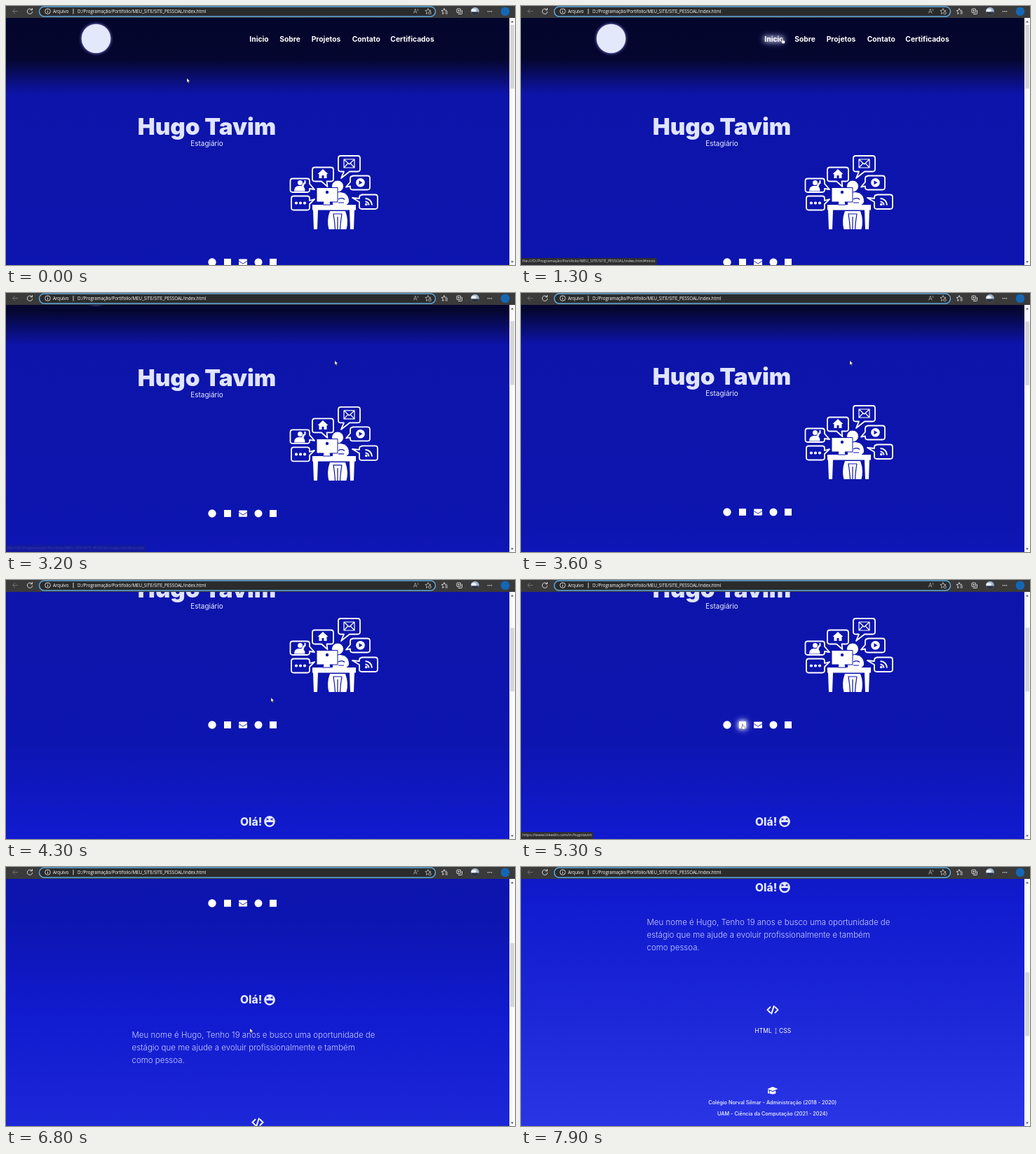
Recreate the animation shown at these times as an HTML page. Size 726 by 370 pixels, loop 8 s.

```html
<!DOCTYPE html>
<html lang="pt-BR">
<head>
<meta charset="utf-8">
<title>Portifolio</title>
<style>
html, body { margin: 0; width: 100%; height: 100%; overflow: hidden; background: #0d14ab; }
svg { position: absolute; left: 0; top: 0; display: block; }
.nav { font: 700 10.3px Inter, sans-serif; fill: #fff; text-anchor: middle; }
.title { font: 900 33.3px Inter, sans-serif; fill: #dfe4ff; text-anchor: middle; }
.role { font: 400 10px Inter, sans-serif; fill: #e9ecff; text-anchor: middle; }
.hello { font: 800 15.6px Inter, sans-serif; fill: #e3e7ff; }
.about { font: 300 11.5px Inter, sans-serif; fill: #c9cfff; }
.skill { font: 400 8.5px Inter, sans-serif; fill: #fff; }
.school { font: 500 7.3px Inter, sans-serif; fill: #f4f5ff; text-anchor: middle; }
.url { font: 500 6.24px "Open Sans", sans-serif; fill: #fff; }
.glow { filter: drop-shadow(0 0 3px #fff) drop-shadow(0 0 5px #aab4ff); }
#status {
  position: absolute; left: 0; bottom: 0; box-sizing: border-box; height: 10px; padding: 0 2px;
  font: 400 5.38px/9.5px "Open Sans", sans-serif; white-space: nowrap;
  color: #dcdcdc; background: #2e2e30; border-radius: 0 2px 0 0;
}
</style>
</head>
<body>
<svg width="726" height="370" viewBox="0 0 726 370">
  <defs>
    <linearGradient id="sky" gradientUnits="userSpaceOnUse" x1="0" y1="0" x2="0" y2="850">
      <stop offset="0" stop-color="#04052b"/>
      <stop offset=".09" stop-color="#05062f"/>
      <stop offset=".148" stop-color="#0d14a9"/>
      <stop offset=".46" stop-color="#0d15b0"/>
      <stop offset=".62" stop-color="#111bcf"/>
      <stop offset=".8" stop-color="#1c27d8"/>
      <stop offset="1" stop-color="#2a36e6"/>
    </linearGradient>
    <clipPath id="face"><circle cx="669" cy="7.500" r="5.800"/></clipPath>
  </defs>

  <g id="page">
    <rect width="718" height="900" fill="url(#sky)"/>
    <circle cx="128.500" cy="46.500" r="20.800" fill="#e4e8fb" style="filter:drop-shadow(0 0 2px #8f9bff)"/>

    <g class="nav">
      <text class="link" x="361" y="50.500">Inicio</text>
      <text class="link" x="405" y="50.500">Sobre</text>
      <text class="link" x="456.500" y="50.500">Projetos</text>
      <text class="link" x="513.700" y="50.500">Contato</text>
      <text x="579.500" y="50.500">Certificados</text>
    </g>

    <text class="title" x="286.500" y="184">Hugo Tavim</text>
    <text class="role" x="286.500" y="200">Estagiário</text>

    <!-- speech bubbles -->
    <g fill="none" stroke="#fff" stroke-width="1.800" stroke-linejoin="round">
      <path d="M477.500 214h24q3.500 0 3.500 3.500v15.500q0 3.500-3.500 3.500h-11.500l-12 9.500 4-9.500h-4.500q-3.500 0-3.500-3.500v-15.500q0-3.500 3.500-3.500z"/>
      <path d="M440.500 230.500h23q3.500 0 3.500 3.500v13q0 3.500-3.500 3.500h-6l1 7.500-8.500-7.500h-9.500q-3.500 0-3.500-3.500v-13q0-3.500 3.500-3.500z"/>
      <path d="M409 246.500h20.500q3.500 0 3.500 3.500v4l7 8-7-1v1.500q0 3.500-3.500 3.500h-20.500q-3.500 0-3.500-3.500v-12.500q0-3.500 3.500-3.500z"/>
      <path d="M410.500 271.500h19q3.500 0 3.500 3.500v3l7-2-7 7v5q0 3.500-3.500 3.500h-19q-3.500 0-3.500-3.500v-13q0-3.500 3.500-3.500z"/>
      <path d="M494.500 242.500h21q3.500 0 3.500 3.500v13q0 3.500-3.500 3.500h-21q-3.500 0-3.500-3.500v-1.500l-6 1 6-7v-5q0-3.500 3.500-3.500z"/>
      <path d="M507.500 269.500h19q3.500 0 3.500 3.500v13.500q0 3.500-3.500 3.500h-19q-3.500 0-3.500-3.500v-6.500l-10-6 10 1v-1.500q0-3.500 3.500-3.500z"/>
      <path d="M482 219h15v12h-15zl7.500 7 7.500-7M482 231l5.500-6M497 231l-5.500-6" stroke-width="1.200"/>
      <path d="M512.500 279.500a5 5 0 0 1 5 5M512.500 275a9.500 9.500 0 0 1 9.500 9.500" stroke-width="2"/>
    </g>
    <g fill="#fff">
      <path d="M452 233l7.500 7h-2v6h-4v-4h-3v4h-4v-6h-2z"/>
      <circle cx="419.500" cy="252.500" r="3.500"/>
      <path d="M411 264.500q0-7 6-7.500h4.500l3-5 2 1-2 5q2 2 2 6.500z"/>
      <path d="M425.500 249h2v5h-2z"/>
      <circle cx="414" cy="281.500" r="2.100"/><circle cx="420" cy="281.500" r="2.100"/><circle cx="426" cy="281.500" r="2.100"/>
      <circle cx="505.500" cy="252.300" r="6.300"/>
      <circle cx="513.800" cy="283.500" r="1.800"/>
      <!-- worker and desk -->
      <path d="M466 266.500q16-3 21.500 5.500 4 9-2 12h-19.500z"/>
      <circle cx="473" cy="257.500" r="8.500" stroke="#0d14ab" stroke-width="1"/>
      <path d="M437 284h62v7.500h-2l-1 27.500h-5l-1-27.500h-45l-1 27.500h-5l-1-27.500h-1z"/>
      <path d="M462 293h22q5 13 1.500 26h-25q-3.500-13 1.500-26z"/>
      <path d="M443 259.500h30v20.500h-11l1 4h-11l1-4h-10z" stroke="#0d14ab" stroke-width="1"/>
    </g>
    <g fill="#0d14ab">
      <circle cx="458" cy="266" r="2.200"/>
      <path d="M503.500 249.300l5 3-5 3z"/>
    </g>
    <g fill="none" stroke="#0d14ab" stroke-width="1.200">
      <path d="M474 276q6-3 9 .5M474 281h8"/>
      <path d="M479 297h-12q2 12 2.500 22M479 297q-2 12-2.500 22M473 301v18"/>
    </g>

    <!-- contact row -->
    <g fill="#fff">
      <circle class="link" cx="294" cy="366" r="5.700"/>
      <rect class="link" x="311" y="361" width="10" height="10"/>
      <g class="link">
        <rect x="332" y="361.500" width="12" height="9.300" rx="1.300"/>
        <path d="M332 364.300l6 3.900 6-3.900" fill="none" stroke="#0d15b0" stroke-width=".9"/>
      </g>
      <circle class="link" cx="360" cy="366" r="5.500"/>
      <rect x="376" y="361" width="10" height="10"/>
    </g>

    <text class="hello" x="334" y="509.700">Olá!</text>
    <circle cx="376" cy="504" r="7.900" fill="#e3e7ff"/>
    <g fill="none" stroke="#111bcf" stroke-width="1.200">
      <path d="M371.500 502l2.500-1-2.500-1.500M380.500 502l-2.500-1 2.500-1.500"/>
      <path d="M371 505h10q-1 4.500-5 4.500t-5-4.500z" fill="#111bcf" stroke="none"/>
    </g>

    <g class="about">
      <text x="179.500" y="558">Meu nome é Hugo, Tenho 19 anos e busco uma oportunidade de</text>
      <text x="179.500" y="576">estágio que me ajude a evoluir profissionalmente e também</text>
      <text x="179.500" y="594">como pessoa.</text>
    </g>

    <path d="M355.500 675l-4 4 4 4M362.500 675l4 4-4 4M360.800 673.500l-3.600 11" fill="none" stroke="#fff" stroke-width="1.900" stroke-linecap="round"/>
    <text class="skill" x="333.500" y="712">HTML</text>
    <text class="skill" x="368" y="712">CSS</text>

    <path d="M351.500 792l7.500-3 7.500 3-7.500 3zM355 794.500l4 1.600 4-1.600.6 3.600q-4.600 2.500-9.200 0zM352.500 793h1l.6 5.500h-2.200z" fill="#fff"/>
    <g class="school">
      <text x="358.700" y="813.500">Colégio Norval Silmar - Administração (2018 - 2020)</text>
      <text x="358.700" y="829.500">UAM - Ciência da Computação (2021 - 2024)</text>
    </g>
  </g>

  <!-- scroll bar -->
  <rect x="718" y="17" width="8" height="353" fill="#fafafa"/>
  <rect id="thumb" x="719" y="27" width="6" height="91" fill="#d6d6d6"/>
  <path d="M720 23.500l2-2.500 2 2.500zM720 364.500l2 2.500 2-2.500z" fill="#555"/>

  <!-- browser bar -->
  <rect width="726" height="17" fill="#3a3a3b"/>
  <rect x="47.500" y="1" width="565" height="14" rx="7" fill="#2b2b2c" stroke="#5ea9dd" stroke-width="1.500"/>
  <g fill="none" stroke="#e8e8e8" stroke-width=".9">
    <path d="M17 7.500h-7.500l3.500-3.500M9.500 7.500l3.500 3.500" stroke="#777"/>
    <path d="M37 5.500a3.700 3.700 0 1 0 .7 2.500M37.500 3v2.700h-2.700"/>
    <circle cx="59.500" cy="7.500" r="3.800"/>
    <path d="M59.500 7v2.700M59.500 5.200v.9M96 3.800v7.700"/>
    <path d="M581.500 10.500l2.300-6.500 2.300 6.500M582.300 8.400h3M587 4q1.500 1 .5 3" stroke="#999"/>
    <path d="M602 3.500l1.200 2.700 2.900.3-2.200 1.900M602 3.500l-1.200 2.700-2.900.3 2.200 2-.6 2.900 2-1.200" stroke="#bbb"/>
    <circle cx="604.500" cy="10" r="1.800" stroke="#bbb"/>
    <path d="M625 3.500l1.200 2.700 2.900.3M625 3.500l-1.200 2.700-2.700.3 2.200 2-.6 2.900 2-1.200M626.500 8.500h3.500M626.500 10.800h3.500"/>
    <rect x="643" y="4" width="5.500" height="5.500" rx="1"/>
    <path d="M645 11.500h4.500q1 0 1-1v-4.500M645.800 5.500v2.600M644.500 6.800h2.600"/>
  </g>
  <g clip-path="url(#face)">
    <rect x="663" y="1" width="12" height="13" fill="#9fb4cf"/>
    <ellipse cx="667" cy="6" rx="4" ry="2" fill="#eef2f6"/>
    <rect x="663" y="8.500" width="12" height="6" fill="#2a3340"/>
  </g>
  <g fill="#e8e8e8"><circle cx="687.500" cy="7.700" r=".8"/><circle cx="690" cy="7.700" r=".8"/><circle cx="692.500" cy="7.700" r=".8"/></g>
  <circle cx="712" cy="7.700" r="6.300" fill="#1467b5"/>
  <text class="url" x="67" y="9.800">Arquivo</text>
  <text class="url" x="102" y="9.800">D:/Programação/Portifolio/MEU_SITE/SITE_PESSOAL/index.html</text>
</svg>
<div id="status"></div>
<svg width="726" height="370" viewBox="0 0 726 370">
  <g id="cursor" stroke-linejoin="round">
    <path d="M0 0v6.200l1.400-1.300 1 2.200 1-.4-1-2.200h2z" fill="#fff" stroke="#111" stroke-width=".4"/>
    <path d="M-.6 0q.6-.8 1.200 0v2.800l2.700.6q.7.300.5 1.400l-.6 2.700h-3.200l-2-3q.2-.8 1.400 0z" fill="#fff" stroke="#111" stroke-width=".4"/>
    <path d="M-1.500-2h3M0-2v6.500M-1.500 4.500h3" fill="none" stroke="#a9aed0" stroke-width=".8"/>
  </g>
</svg>
<script>
const LOOP = 8000;
const $ = id => document.getElementById(id);
const page = $('page'), thumb = $('thumb'), status = $('status'), cursor = $('cursor');
const links = [...document.querySelectorAll('.link')];
const home = 'file:///D:/Programação/Portifolio/MEU_SITE/SITE_PESSOAL/index.html#';

// time, x, y
const path = [
  [0, 258, 103], [720, 258, 103], [1100, 365, 46], [1250, 365, 46], [1500, 404, 47],
  [1650, 404, 47], [2000, 442, 47], [2300, 474.5, 47], [2500, 505, 48], [2750, 505, 48],
  [3000, 478, 82], [3200, 469, 96.5], [3650, 469, 96.5], [4000, 425, 135], [4300, 378, 168],
  [4500, 319, 203], [4560, 319, 203], [4800, 297, 205], [5000, 293, 206], [5150, 293, 206],
  [5300, 316, 206], [5650, 316, 206], [5950, 338, 207], [6200, 359, 207], [6400, 348.5, 229],
  [6800, 348, 230.5], [7000, 363.5, 233], [LOOP, 363.5, 233]
];
// start, duration, distance
const wheel = [[2900, 450, 53], [3700, 520, 106], [6400, 580, 160], [7520, 520, 159]];
// time, link under the pointer
const hover = [
  [0, -1], [1050, 0], [1400, 1], [1900, 2], [2430, 3], [2850, -1], [4450, 5], [4750, 4],
  [5250, 5], [5850, 6], [6080, 7], [6320, -1]
];
// time, status text
const notes = [
  [0, ''], [1300, home + 'inicio'], [1500, home + 'sobre'], [2000, home + 'projetos'],
  [2480, home + 'contato'], [3300, ''], [5200, 'https://github.com/hugotavim'],
  [5300, 'https://www.linkedin.com/in/hugotavim'], [5900, 'mailto:hugotavim@example.com'],
  [6100, 'https://wa.me/11900000142'], [6650, '']
];
const fades = [[3000, 3250], [6450, 6650]];

const clamp = v => Math.max(0, Math.min(1, v));
const at = (steps, t) => steps.filter(s => s[0] <= t).pop()[1];

function pointer(t) {
  const i = path.findIndex(p => p[0] > t);
  const [a, b] = [path[i - 1], path[i]];
  const u = (t - a[0]) / (b[0] - a[0]);
  return [a[1] + (b[1] - a[1]) * u, a[2] + (b[2] - a[2]) * u];
}

function draw(t) {
  const scroll = wheel.reduce((sum, [start, time, dist]) =>
    sum + dist * (1 - (1 - clamp((t - start) / time)) ** 3), 0);
  page.setAttribute('transform', `translate(0 ${-scroll})`);
  thumb.setAttribute('y', 27 + scroll * 0.26);

  const over = at(hover, t);
  links.forEach((link, i) => link.classList.toggle('glow', i === over));

  const [x, y] = pointer(t);
  cursor.setAttribute('transform', `translate(${x} ${y})`);
  const shape = t >= 6950 ? 2 : over >= 0 ? 1 : 0;
  [...cursor.children].forEach((c, i) => c.style.display = i === shape ? '' : 'none');

  const note = at(notes, t);
  status.textContent = note;
  const fade = fades.find(f => t >= f[0] && t < f[1]);
  status.style.opacity = !note ? 0 : fade ? 1 - (t - fade[0]) / (fade[1] - fade[0]) : 1;
}

let began;
function tick(now) {
  began ??= now;
  draw((now - began) % LOOP);
  requestAnimationFrame(tick);
}
draw(0);
requestAnimationFrame(tick);
</script>
</body>
</html>
```
